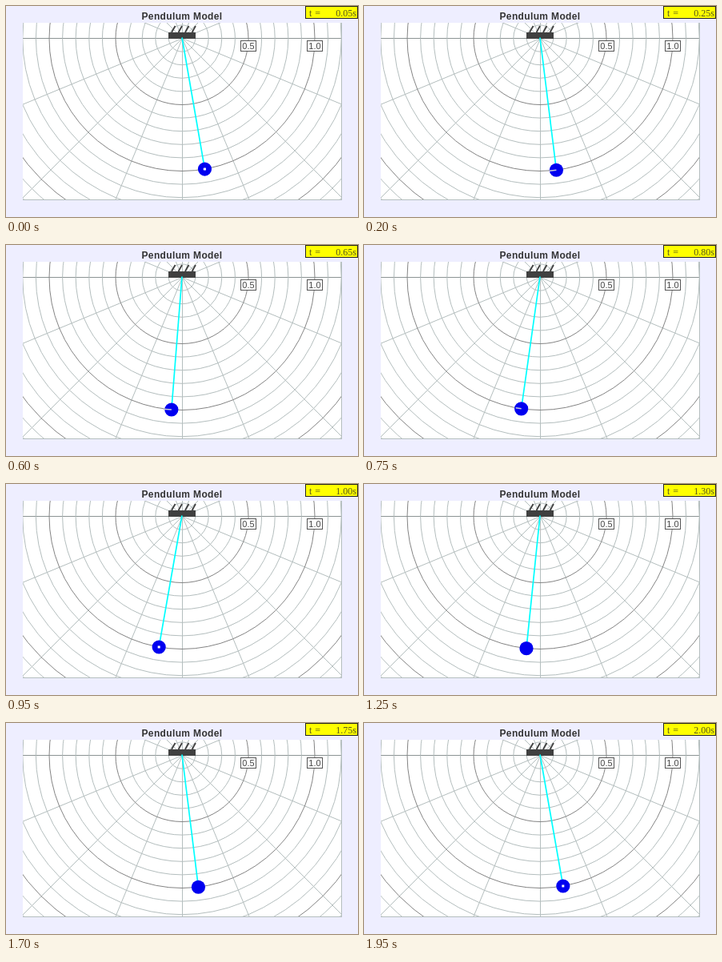
Write an HTML page with a canvas that moves like this. It is 440 px wide and 264 px high and loops after 2 s.

```html
<!DOCTYPE html>
<html lang="en">
<head>
<meta charset="utf-8">
<title>Pendulum Model</title>
<style>
html, body { margin: 0; width: 100%; height: 100%; overflow: hidden; background: #eef; }
canvas { display: block; }
</style>
</head>
<body>
<canvas id="stage" width="440" height="264"></canvas>
<script>
const ctx = document.getElementById('stage').getContext('2d');
const TAU = Math.PI * 2;
const pivot = { x: 220, y: 40.5 };
const unit = 166;            // pixels per metre
const amplitude = 10 * Math.PI / 180;
const period = 2, step = 0.05;
const sans = 'Arial, "Liberation Sans", sans-serif';
const serif = '"Times New Roman", "Liberation Serif", serif';

function line(x1, y1, x2, y2, color, width = 1) {
  ctx.strokeStyle = color;
  ctx.lineWidth = width;
  ctx.beginPath();
  ctx.moveTo(x1, y1);
  ctx.lineTo(x2, y2);
  ctx.stroke();
}

function box(x, y, w, h, fill, border) {
  ctx.fillStyle = fill;
  ctx.fillRect(x, y, w, h);
  ctx.strokeStyle = border;
  ctx.lineWidth = 1;
  ctx.strokeRect(x + 0.5, y + 0.5, w - 1, h - 1);
}

function text(str, x, y, font, color, align = 'left', spacing = 0) {
  ctx.font = font;
  ctx.fillStyle = color;
  ctx.textAlign = align;
  ctx.letterSpacing = spacing + 'px';
  ctx.fillText(str, x, y);
}

function drawGrid() {
  ctx.fillStyle = '#fff';
  ctx.fillRect(21, 21, 398, 222);
  ctx.save();
  ctx.beginPath();
  ctx.rect(21, 21, 398, 222);
  ctx.clip();
  for (let i = 0; i < 16; i++) {
    const a = i * TAU / 16;
    line(pivot.x + 0.5, pivot.y, pivot.x + 0.5 + 300 * Math.cos(a),
         pivot.y + 300 * Math.sin(a), i % 8 ? '#b4bebe' : '#8c9494');
  }
  for (let i = 1; i <= 17; i++) {
    ctx.strokeStyle = i % 5 ? '#b4bebe' : '#848484';
    ctx.lineWidth = 1;
    ctx.beginPath();
    ctx.arc(pivot.x, pivot.y, i * unit / 10, 0, TAU);
    ctx.stroke();
  }
  ctx.restore();
  line(419.5, 21, 419.5, 243, '#b4bebe');
  line(21, 242.5, 420, 242.5, '#b4bebe');
  for (const r of [0.5, 1]) {
    const x = Math.round(pivot.x + r * unit);
    box(x - 10, 43, 20, 14, '#fff', '#555');
    text(r.toFixed(1), x, 54, '11px ' + sans, '#444', 'center');
  }
}

function drawSupport() {
  for (let x = 207; x < 236; x += 8.5) line(x, 33, x + 4.5, 25, '#404040', 1.8);
  ctx.fillStyle = '#404040';
  ctx.fillRect(203, 33, 34, 8);
}

function drawPendulum(t) {
  const phase = TAU * t / period;
  const angle = amplitude * Math.cos(phase);
  const x = pivot.x + unit * Math.sin(angle);
  const y = pivot.y + unit * Math.cos(angle);
  line(pivot.x, pivot.y - 1, x, y, '#0ff', 1.7);
  ctx.fillStyle = '#0000f0';
  ctx.beginPath();
  ctx.arc(x, y, 8.6, 0, TAU);
  ctx.fill();

  // pale velocity mark, seen on the leftward swing
  const speed = Math.sin(phase);
  if (speed > -0.2) {
    const len = 12 * Math.max(0, speed);
    const dx = -len * Math.cos(angle), dy = len * Math.sin(angle);
    line(x, y, x + dx, y + dy, '#c8ccd8', 1.5);
    if (len < 4) {
      ctx.fillStyle = '#fff';
      ctx.fillRect(x - 1.5, y - 1.5, 3, 3);
    }
  }
}

function drawClock(t) {
  box(374, 0, 66, 16, '#ff0', '#222');
  text('t =', 379, 13, '12px ' + serif, '#55551a', 'left', 0.5);
  text(t.toFixed(2) + 's', 438, 13, '12px ' + serif, '#55551a', 'right');
}

function draw(now) {
  const t = (Math.floor(now % (period * 1000) / (step * 1000)) + 1) * step;
  ctx.fillStyle = '#eef';
  ctx.fillRect(0, 0, 440, 264);
  text('Pendulum Model', 220, 17, 'bold 12px ' + sans, '#333', 'center', 0.36);
  drawGrid();
  drawSupport();
  drawPendulum(t);
  drawClock(t);
}

const start = performance.now();
function frame() {
  draw(performance.now() - start);
  requestAnimationFrame(frame);
}
frame();
</script>
</body>
</html>
```
